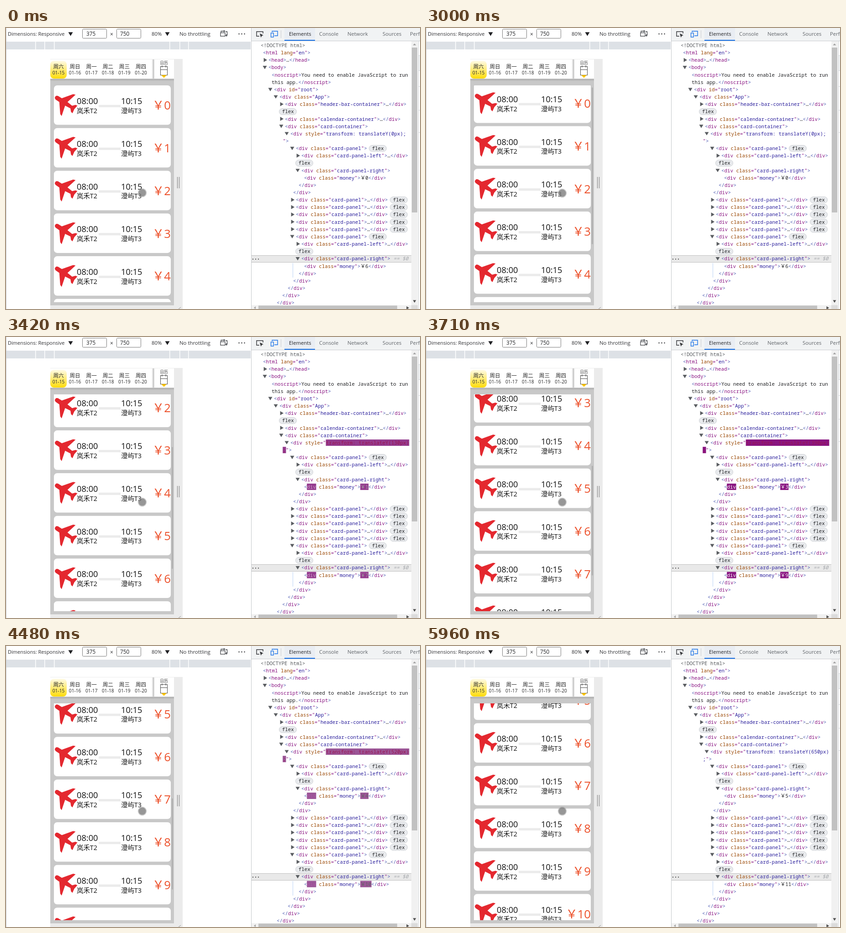
An HTML page with a canvas that plays this animation: 907 by 617 pixels, repeating every 8 s.

```html
<!DOCTYPE html>
<html lang="zh-CN">
<head>
<meta charset="utf-8">
<title>Virtual list</title>
<style>
html, body { margin: 0; width: 100%; height: 100%; overflow: hidden; background: #fff; }
canvas { display: block; width: 907px; height: 617px; }
</style>
</head>
<body>
<canvas id="stage" width="907" height="617"></canvas>
<script>
const ctx = document.getElementById('stage').getContext('2d');
const LOOP = 8000, PITCH = 93.77, VIEW = 476, FADE = 1400;
const UI = '"Open Sans", "Noto Sans CJK SC", "Noto Sans CJK", sans-serif';
const MONO = '10.83px "Noto Sans Mono", "Noto Sans CJK SC", "Noto Sans CJK", monospace';
const TAG = '#881280', MARK = '#4a58b0', ATTR = '#994500', VALUE = '#2a1f9c', INK = '#202124';

const STEPS = [0, 500, 3000, 3150, 3300, 3420, 3590, 3710, 3830, 3980, 4100, 4220,
  4350, 4470, 4600, 4720, 4840, 4960, 5130, 5270, 5420, 5660, 5810, 5960];
// [time, first rendered card]
const UPDATES = [[3200, 1], [3560, 2], [3700, 3], [3970, 4], [4560, 5]];

function scrollAt(t) {
  if (t < 3000) return 0;
  if (t < 3420) return 4.2 + 198 * (t - 3000) / 420;
  if (t < 3980) {
    const u = (t - 3420) / 560;
    return 202.2 + 187 * (u + 0.15 * u * (1 - u));
  }
  const u = Math.min(1, (t - 3980) / 740);
  return 389.2 + 130 * (1 - Math.pow(1 - u, 1.35));
}

// cubic-bezier(0, 0, 0.2, 1)
function ease(x) {
  let lo = 0, hi = 1, s = 0.5;
  for (let i = 0; i < 18; i++) {
    s = (lo + hi) / 2;
    if (0.6 * (1 - s) * s * s + s * s * s < x) lo = s; else hi = s;
  }
  return 3 * (1 - s) * s * s + s * s * s;
}

function mix(a, b, u) {
  return 'rgb(' + a.map((v, i) => Math.round(v + (b[i] - v) * u)).join(',') + ')';
}

function rect(x, y, w, h, color) {
  ctx.fillStyle = color;
  ctx.fillRect(x, y, w, h);
}

function round(x, y, w, h, r, fill, stroke) {
  ctx.beginPath();
  ctx.roundRect(x, y, w, h, r);
  if (fill) { ctx.fillStyle = fill; ctx.fill(); }
  if (stroke) { ctx.strokeStyle = stroke; ctx.lineWidth = 1; ctx.stroke(); }
}

function poly(points, color) {
  ctx.beginPath();
  points.forEach(p => ctx.lineTo(p[0], p[1]));
  ctx.closePath();
  ctx.fillStyle = color;
  ctx.fill();
}

function lines(color, width, ...paths) {
  ctx.strokeStyle = color;
  ctx.lineWidth = width;
  for (const path of paths) {
    ctx.beginPath();
    path.forEach(p => ctx.lineTo(p[0], p[1]));
    ctx.stroke();
  }
}

function dot(x, y, r, color) {
  ctx.beginPath();
  ctx.arc(x, y, r, 0, 7);
  ctx.fillStyle = color;
  ctx.fill();
}

function text(s, x, y, size, color, align = 'left') {
  ctx.font = size + 'px ' + UI;
  ctx.textAlign = align;
  ctx.fillStyle = color;
  ctx.fillText(s, x, y);
}

function down(x, y, r, color) {
  poly([[x - r, y - r * 0.75], [x + r, y - r * 0.75], [x, y + r * 0.9]], color);
}

function right(x, y, r, color) {
  poly([[x - r * 0.75, y - r], [x - r * 0.75, y + r], [x + r * 0.9, y]], color);
}

// ---- device toolbar and ruler ----

function toolbar() {
  rect(0, 0, 1, 617, '#cacdd1');
  text('Dimensions: Responsive', 4, 17, 11, '#303134');
  down(141.5, 13, 5, INK);
  round(167.5, 2.5, 53, 20, 2, '#fff', '#7c7c7c');
  round(242.5, 2.5, 53, 20, 2, '#fff', '#7c7c7c');
  text('375', 176, 17, 11.8, INK);
  text('×', 231.5, 18, 12, '#303134', 'center');
  text('750', 250, 17, 11.8, INK);
  text('80%', 319, 17, 11.3, '#303134');
  down(353.5, 13, 5, INK);
  text('No throttling', 380, 17, 11.4, '#303134');

  ctx.strokeStyle = '#45484c';
  ctx.lineWidth = 1.3;
  ctx.strokeRect(470, 10.5, 10, 7.5);
  lines('#45484c', 1.3, [[471, 10], [471, 7], [479, 7]], [[477, 5], [479.5, 7], [477, 9]],
    [[481, 8], [484.5, 8], [484.5, 16], [482, 16]], [[484, 14], [481.5, 16], [484, 18.5]]);
  for (let i = 0; i < 3; i++) dot(510.5 + i * 6, 13, 1.2, '#303134');

  rect(1, 30, 535, 17, '#dde1e6');
  for (const x of [64, 84, 105, 358, 380, 399]) rect(x, 30, 1.5, 17, '#fff');
}

// ---- phone page ----

function phoneFrame() {
  rect(368, 68, 19, 549, '#ebebeb');
  rect(97, 609, 290, 8, '#ebebeb');
  lines('#8d8d8d', 1, [[378, 617], [383, 613]]);
  lines('#8d8d8d', 1.3, [[375.5, 327], [375.5, 352]], [[379.5, 327], [379.5, 352]]);
  rect(97, 111, 271, 498, '#c8c8c8');
  const shade = ctx.createLinearGradient(0, 111, 0, 117);
  shade.addColorStop(0, '#a6a6a6');
  shade.addColorStop(1, '#c8c8c8');
  rect(97, 111, 271, 6, shade);
}

function header() {
  rect(97, 68, 271, 43.5, '#fff');
  rect(97, 68, 271, 1, '#eee');
  const gold = ctx.createLinearGradient(0, 72, 0, 111);
  gold.addColorStop(0, '#fffbe6');
  gold.addColorStop(1, '#ffdc0a');
  round(97, 72, 36, 39, 8, gold);
  ['六', '日', '一', '二', '三', '四'].forEach((day, i) => {
    const x = 115 + i * 36.1;
    text('周' + day, x, 88.5, 11.6, '#222', 'center');
    text('01-' + (15 + i), x, 101.5, 10.2, '#222', 'center');
  });
  const edge = ctx.createLinearGradient(319, 0, 325, 0);
  edge.addColorStop(0, '#fff');
  edge.addColorStop(0.85, '#bdbdbd');
  edge.addColorStop(1, '#fff');
  rect(319, 69, 6, 42, edge);
  text('日历', 346, 79.5, 8.8, '#333', 'center');
  ctx.strokeStyle = '#555';
  ctx.lineWidth = 1.1;
  ctx.strokeRect(338.5, 84.5, 15, 19);
  lines('#555', 1.1, [[338.5, 91.5], [353.5, 91.5]], [[342, 82], [342, 86.5]], [[350, 82], [350, 86.5]]);
  poly([[340, 103.5], [352, 103.5], [346, 109.5]], '#ffc400');
}

// one side of the airplane, nose at the origin
const HALF = [[0, 0], [0.8, 3], [4, 4.8], [14, 5], [30, 26], [35, 28], [29, 4.8],
  [42, 3.4], [47, 9], [51.5, 10], [50, 0]];

function plane(x, y) {
  ctx.save();
  ctx.translate(x, y);
  ctx.rotate(33 * Math.PI / 180);
  const mirror = HALF.map(p => [p[0], -p[1]]).reverse();
  poly(HALF.concat(mirror), '#e4282f');
  ctx.restore();
}

function card(n, y) {
  round(105, y, 256, 86.6, 7, '#fff');
  plane(107.8, y + 24.8);
  text('08:00', 155, y + 41, 18.2, '#111');
  text('岚禾T2', 155, y + 60.8, 14.4, '#111');
  rect(203, y + 42.8, 48, 5.2, '#ebebeb');
  text('10:15', 252, y + 41, 18.2, '#111');
  text('澄屿T3', 252, y + 60.8, 14.4, '#111');
  text('￥' + n, 361, y + 53.2, 25.6, '#ec502a', 'right');
}

function list(t) {
  const pos = scrollAt(t), first = Math.floor(pos / PITCH);
  ctx.save();
  ctx.beginPath();
  ctx.rect(105, 126, 256, VIEW);
  ctx.clip();
  for (let n = first; n < first + 7; n++) card(n, 126 + n * PITCH - pos);
  ctx.restore();

  if (t >= 3000 && t < 5270) {
    const size = PITCH * (7 + first);
    ctx.globalAlpha = t < 5130 ? 1 : 0.5;
    round(363.3, 127.5 + pos * VIEW / size, 2.2, VIEW * VIEW / size - 1, 1.1, '#a8a8a8');
    ctx.globalAlpha = 1;
  }

  const y = t < 500 ? 361.8 : 362.6;
  dot(298.5, y, 9.8, 'rgba(150,150,150,.5)');
  dot(298.5, y, 8, 'rgba(112,112,112,.58)');
}

// ---- element tree ----

const rowY = row => 38 + row * 16.15;

// draws [string, colour, background] parts in sequence and returns the end x
function code(row, x, ...parts) {
  const y = rowY(row);
  ctx.font = MONO;
  ctx.textAlign = 'left';
  for (const [s, color, back] of parts) {
    const w = ctx.measureText(s).width;
    if (back) rect(x - 0.3, y - 6.8, w + 0.8, 14, back);
    ctx.fillStyle = color;
    ctx.fillText(s, x, y + 4);
    x += w;
  }
  return x;
}

const attribute = (name, value) =>
  [[' ', TAG], [name, ATTR], ['="', TAG], [value, VALUE], ['"', TAG]];
const open = (name, attr, value) =>
  [['<', MARK], [name, TAG], ...(attr ? attribute(attr, value) : []), ['>', MARK]];
const close = name => [['</', MARK], [name, TAG], ['>', MARK]];
const folded = (name, attr, value) =>
  [...open(name, attr, value), ['…', INK], ...close(name)];

function arrow(row, x, isOpen) {
  if (isOpen) down(x - 8, rowY(row), 4.5, '#5a5d61');
  else right(x - 7, rowY(row), 4.5, '#5a5d61');
}

function node(row, x, isOpen, name, attr, value) {
  arrow(row, x, isOpen);
  code(row, x, ...(isOpen ? open : folded)(name, attr, value));
}

function flex(row, x) {
  round(x + 0.5, rowY(row) - 6.5, 38, 13.5, 6.7, '#e9ebee', '#cdd0d4');
  code(row, x + 6.8, ['flex', INK]);
}

function money(row, n, glow) {
  const back = glow && glow.back;
  code(row, 653, ['<', MARK], ['div', glow ? glow.tag : TAG, back],
    ...attribute('class', 'money'), ['>', MARK],
    ['￥' + n, glow ? glow.ink : INK, back], ...close('div'));
}

function styled(n, glow) {
  const head = [['<', MARK], ['div ', TAG], ['style', ATTR], ['="', TAG]];
  const tail = [['"', TAG], ['>', MARK]];
  const value = 'transform: translateY(' + n * 130 + 'px)';
  const color = glow ? glow.value : VALUE, back = glow && glow.back;
  arrow(12, 623, true);
  if (n) {
    code(12, 623, ...head, [value, color, back]);
    code(13, 606.5, [';', color, back], ...tail);
  } else {
    code(12, 623, ...head, [value + ';', VALUE]);
    code(13, 606.5, ...tail);
  }
}

function glowAt(age) {
  if (age >= FADE) return null;
  const white = [255, 255, 255], purple = [136, 18, 128], mauve = [160, 102, 156];
  const u = ease(age / FADE), hold = FADE * 0.8;
  return {
    back: age < hold ? mix(purple, mauve, ease(age / hold))
      : mix(mauve, white, ease((age - hold) / (FADE - hold))),
    ink: mix(white, [32, 33, 36], u),
    tag: mix(white, purple, u),
    value: age < hold ? '#9a1450' : VALUE
  };
}

function tree(t) {
  const last = UPDATES.filter(u => u[0] <= t).pop();
  const n = last ? last[1] : 0;
  const glow = last ? glowAt(t - last[0]) : null;

  rect(538, 499, 350, 16, '#e9e9e9');
  rect(538, 499, 350, 1, '#bfbfbf');
  rect(538, 514, 350, 1, '#bfbfbf');
  rect(628, 516, 1, 32, '#bcd5f5');

  code(0, 558, ['<!DOCTYPE html>', '#55585c']);
  code(1, 563, ...open('html', 'lang', 'en'));
  node(2, 575, false, 'head');
  node(3, 575, true, 'body');
  code(4, 582, ...open('noscript'), ['You need to enable JavaScript to run', INK]);
  code(5, 582, ['this app.', INK], ...close('noscript'));
  node(6, 587, true, 'div', 'id', 'root');
  node(7, 599, true, 'div', 'class', 'App');
  node(8, 611, false, 'div', 'class', 'header-bar-container');
  flex(9, 598);
  node(10, 611, false, 'div', 'class', 'calendar-container');
  node(11, 611, true, 'div', 'class', 'card-container');
  styled(n, glow);
  for (const [row, k] of [[14, n], [26, n + 6]]) {
    node(row, 635, true, 'div', 'class', 'card-panel');
    flex(row, 795);
    node(row + 1, 647, false, 'div', 'class', 'card-panel-left');
    flex(row + 2, 634);
    node(row + 3, 647, true, 'div', 'class', 'card-panel-right');
    money(row + 4, k, glow);
    code(row + 5, 641, ...close('div'));
    code(row + 6, 629, ...close('div'));
  }
  for (let row = 21; row < 26; row++) {
    node(row, 635, false, 'div', 'class', 'card-panel');
    flex(row, 841);
  }
  for (let i = 0; i < 3; i++) {
    code(33 + i, 617 - i * 12, ...close('div'));
    dot(541 + i * 6, 507.5, 1.1, '#333');
  }
  ctx.font = 'italic ' + MONO;
  ctx.fillStyle = '#a5a8ac';
  ctx.fillText('== $0', 849, rowY(29) + 4);
}

function inspector() {
  rect(537, 0, 1, 617, '#c4c7cb');
  rect(538, 0, 369, 28, '#f1f3f4');
  rect(538, 28, 369, 1, '#cacdd1');

  lines('#303134', 1.4, [[555, 18], [549, 18], [549, 8], [563, 8], [563, 12]]);
  poly([[556, 12], [564, 16], [560.5, 17], [558.5, 21]], '#303134');
  ctx.strokeStyle = '#1a73e8';
  ctx.lineWidth = 1.4;
  ctx.strokeRect(580.5, 11, 5.5, 9);
  lines('#1a73e8', 1.4, [[583, 9], [583, 7], [595, 7], [595, 17], [588, 17]]);
  rect(602, 5, 1, 17, '#cacdd1');

  rect(610, 0, 67, 26, '#e9edf3');
  rect(610, 26, 67, 2, '#1a73e8');
  text('Elements', 620, 17, 11.3, INK);
  [['Console', 686], ['Network', 748], ['Sources', 825], ['Performance', 885]]
    .forEach(([s, x]) => text(s, x, 17, 11.3, '#5f6368'));

  rect(888, 29, 14, 580, '#f1f1f1');
  rect(889, 43, 12, 362, '#c1c1c1');
  poly([[891.5, 38], [898.5, 38], [895, 34]], '#a3a3a3');
  down(895, 600, 3.5, '#505050');
  rect(538, 608.5, 364, 9, '#f1f1f1');
  rect(553, 609.5, 304, 8, '#c1c1c1');
  poly([[547, 611], [547, 617], [543, 614.5]], '#a3a3a3');
  right(880, 614.5, 3.5, '#505050');
  rect(888, 608.5, 14, 9, '#dcdcdc');
  rect(903, 29, 1, 588, '#cacdd1');
  rect(904, 60, 3, 33, '#f1f3f4');
  for (const y of [60, 93, 128, 180, 229]) rect(904, y, 3, 1, '#d5d8dc');
}

function draw(now) {
  const time = now % LOOP;
  const t = STEPS.filter(s => s <= time).pop() || 0;
  rect(0, 0, 907, 617, '#fff');
  toolbar();
  phoneFrame();
  header();
  list(t);
  tree(t);
  inspector();
}

const start = performance.now();
function tick() {
  draw(performance.now() - start);
  requestAnimationFrame(tick);
}
tick();
</script>
</body>
</html>
```
